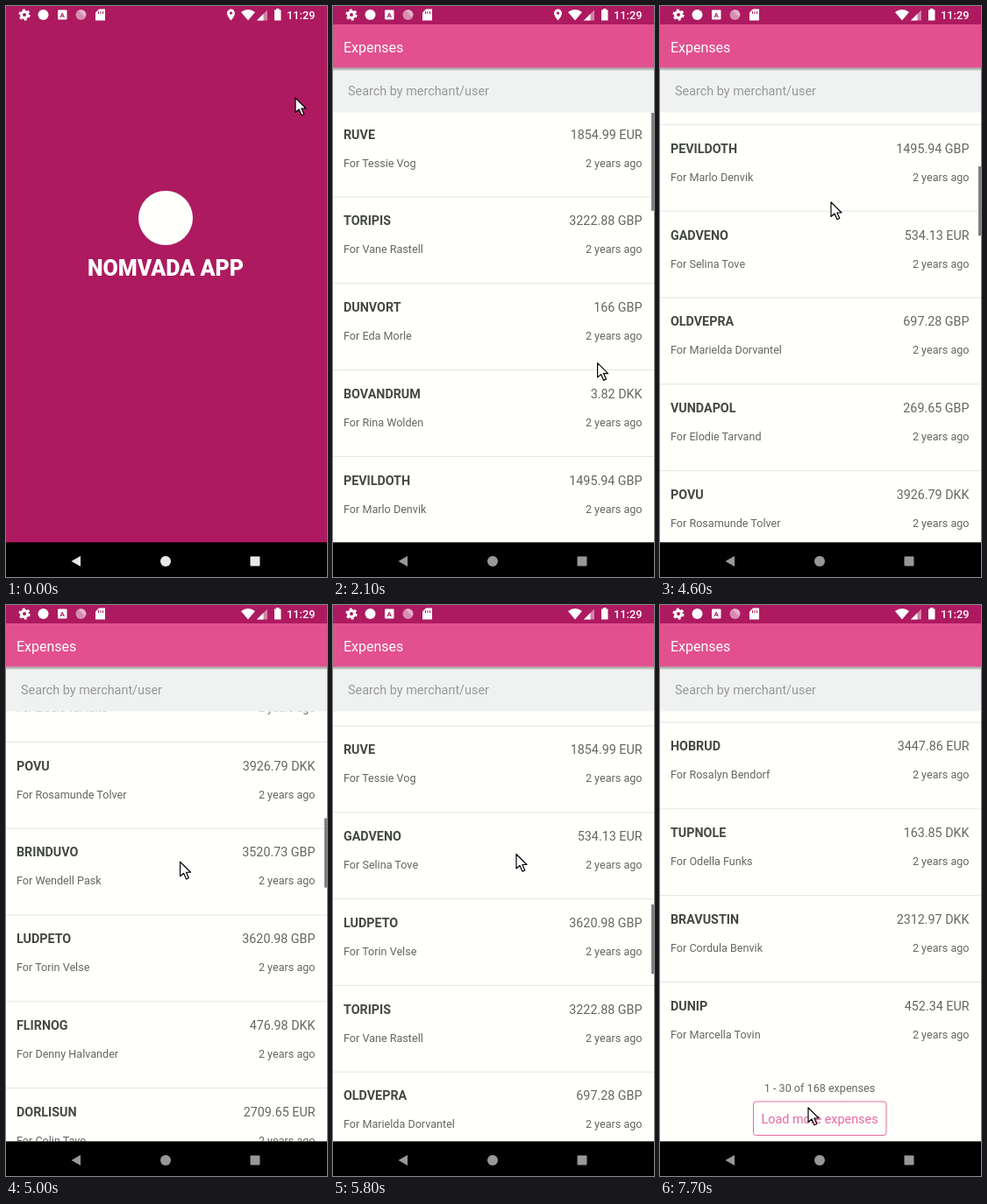
An HTML page that plays this animation: 366 by 652 pixels, repeating every 8000 ms.

```html
<!DOCTYPE html>
<html lang="en">
<head>
<meta charset="utf-8">
<title>Expenses</title>
<style>
  html, body { margin: 0; width: 100%; height: 100%; overflow: hidden; background: #000; }
  svg { display: block; width: 366px; height: 652px; font-family: Roboto, sans-serif; }
  .title { font-size: 14.3px; font-weight: 700; fill: #444842; }
  .amount { font-size: 14.3px; fill: #646662; }
  .note { font-size: 12.6px; fill: #646662; }
  .end { text-anchor: end; }
  .mid { text-anchor: middle; }
</style>
</head>
<body>
<svg viewBox="0 0 366 652">
  <defs>
    <clipPath id="listClip"><rect y="121.5" width="366" height="491"/></clipPath>
    <linearGradient id="shade" x2="0" y2="1">
      <stop stop-color="#000" stop-opacity=".4"/>
      <stop offset="1" stop-color="#000" stop-opacity="0"/>
    </linearGradient>
  </defs>
  <rect width="366" height="652" fill="#fffffc"/>

  <g clip-path="url(#listClip)">
    <g id="list"></g>
    <path id="glow" fill="#e04f8f"/>
    <rect id="bar" x="363" width="3" fill="#7e7e7e"/>
  </g>

  <rect y="70" width="366" height="51.5" fill="#f0f2f1"/>
  <text x="17" y="102" font-size="14.4" fill="#979997">Search by merchant/user</text>
  <rect y="70.4" width="366" height="4" fill="url(#shade)"/>
  <rect y="21" width="366" height="49.4" fill="#e2508f"/>
  <text x="12" y="52.6" font-size="16" fill="#fff">Expenses</text>

  <g id="splash">
    <rect y="21" width="366" height="592" fill="#ad1a60"/>
    <circle cx="182" cy="242" r="31" fill="#fffffc"/>
    <text class="mid" x="182" y="307.5" font-size="25" font-weight="900" fill="#fffffc">NOMVADA APP</text>
  </g>

  <rect width="366" height="21" fill="#ad1a60"/>
  <g fill="#fff" transform="translate(0 -.4)">
    <circle cx="21" cy="10.5" r="3.5" fill="none" stroke="#fff" stroke-width="3"/>
    <circle cx="21" cy="10.5" r="5.6" fill="none" stroke="#fff" stroke-width="2" stroke-dasharray="2.93"/>
    <circle cx="42.5" cy="10.5" r="6"/>
    <rect x="59" y="5" width="10.5" height="11" rx="1"/>
    <text class="mid" x="64.2" y="13.5" font-size="8" font-weight="700" fill="#ad1a60">A</text>
    <circle cx="85.5" cy="10.5" r="6" opacity=".5"/>
    <path d="M83 6a5 5 0 0 1 7 7z" opacity=".35"/>
    <path d="M106 4h7v13h-11V8z"/>
    <path d="M105.5 6.5v3m2.5-3v3m2.5-3v3" stroke="#ad1a60"/>
    <g id="pin">
      <path d="M252 8.5a4.5 4.5 0 0 1 9 0q0 3.5-4.500 8.500q-4.500-5-4.500-8.500z"/>
      <circle cx="256.5" cy="8.5" r="1.6" fill="#ad1a60"/>
    </g>
    <path d="M268 7.500Q276 1.500 284 7.500L276 17z"/>
    <path d="M298 5v12h-12z" opacity=".45"/>
    <path d="M293.500 9.500V17H286z"/>
    <path d="M308 3.500h3.500V5h2v12H306V5h2z"/>
    <text x="320" y="15.4" font-size="12.8" font-weight="500">11:29</text>
  </g>

  <rect y="612.4" width="366" height="40" fill="#000"/>
  <g id="nav">
    <path d="M74.500 634l10.500-6v12z"/>
    <circle cx="182" cy="634" r="6"/>
    <rect x="278.5" y="628.5" width="11" height="11" rx="1"/>
  </g>
  <path id="cursor" d="M0 0V16.500L4 13L7 19.800L9.800 18.500L6.900 12H12Z" fill="#fff" stroke="#000" stroke-width="1.2" stroke-linejoin="round"/>
</svg>
<script>
const LOOP = 8000, STEP = 100;
const LIST_TOP = 122, LIST_H = 491, ROW_H = 98.8, ROWS = 30, FOOTER_H = 81;
const MAX_SCROLL = ROWS * ROW_H + FOOTER_H - LIST_H;
const FLING = 379, REST = 878;

const firstRows = `RUVE|Tessie Vog|1854.99 EUR
TORIPIS|Vane Rastell|3222.88 GBP
DUNVORT|Eda Morle|166 GBP
BOVANDRUM|Rina Wolden|3.82 DKK
PEVILDOTH|Marlo Denvik|1495.94 GBP
GADVENO|Selina Tove|534.13 EUR
OLDVEPRA|Marielda Dorvantel|697.28 GBP
VUNDAPOL|Elodie Tarvand|269.65 GBP
POVU|Rosamunde Tolver|3926.79 DKK
BRINDUVO|Wendell Pask|3520.73 GBP
LUDPETO|Torin Velse|3620.98 GBP
FLIRNOG|Denny Halvander|476.98 DKK
DORLISUN|Colin Tave|2709.65 EUR
VOLIBI|Carver Delnoux|1729.41 DKK`.split("\n");
const lastRows = `HOBRUD|Rosalyn Bendorf|3447.86 EUR
TUPNOLE|Odella Funks|163.85 DKK
BRAVUSTIN|Cordula Benvik|2312.97 DKK
DUNIP|Marcella Tovin|452.34 EUR`.split("\n");

const $ = id => document.getElementById(id);
const set = (id, attrs) => {
  for (const key in attrs) $(id).setAttribute(key, attrs[key]);
};
const progress = (t, from, to) => Math.max(0, Math.min(1, (t - from) / (to - from)));
const easeOut = u => 1 - (1 - u) ** 3;
const smooth = u => u * u * (3 - 2 * u);

function rowMarkup(i) {
  const tail = i - (ROWS - lastRows.length);
  const source = tail >= 0 ? lastRows[tail] : firstRows[i] || firstRows[i * 5 % firstRows.length];
  const [merchant, user, amount] = source.split("|");
  const line = i < ROWS - 1 ? '<rect y="217.5" width="366" height="1" fill="#e4e4e0"/>' : "";
  return `<g transform="translate(0 ${i * ROW_H})">
    <text class="title" x="12" y="151.5">${merchant}</text>
    <text class="amount end" x="352.5" y="151.5">${amount}</text>
    <text class="note" x="12" y="183.5">For ${user}</text>
    <text class="note end" x="352.5" y="183.5">2 years ago</text>${line}</g>`;
}

$("list").innerHTML = Array.from({ length: ROWS }, (_, i) => rowMarkup(i)).join("") +
  `<g transform="translate(0 ${MAX_SCROLL})">
    <text class="note mid" x="182" y="556">1 - 30 of 168 expenses</text>
    <g id="button">
      <rect x="106.5" y="567" width="151.5" height="38.5" rx="3" fill="none" stroke="#e2508f"/>
      <text class="mid" x="182" y="592" font-size="14.4" fill="#e2508f">Load more expenses</text>
    </g></g>`;

// Each gesture glides the cursor on from wherever the previous one left it.
const gestures = [
  { from: 0, to: 1000, x: 301.6, y: 407.6, ease: easeOut },
  { from: 3300, to: 3700, x: 212, y: 352 },
  { from: 3700, to: 3900, x: 187, y: 423 },
  { from: 4100, to: 4600, x: 195, y: 224 },
  { from: 4700, to: 5400, x: 204, y: 400 },
  { from: 5500, to: 6100, x: 214, y: 169 },
  { from: 6400, to: 7000, x: 172, y: 537 },
  { from: 7100, to: 7500, x: 169, y: 574 }
];

function cursorAt(t) {
  let x = 330, y = 105;
  for (const g of gestures) {
    const u = (g.ease || smooth)(progress(t, g.from, g.to));
    x += (g.x - x) * u;
    y += (g.y - y) * u;
  }
  return `translate(${x} ${y})`;
}

// A drag that gathers speed and coasts to rest, then one that runs to the end.
function scrollAt(t) {
  const drag = FLING * progress(t, 4100, 4600) ** 1.6;
  const coast = (REST - FLING) * (1 - (1 - progress(t, 4600, 5400)) ** 2);
  const run = (MAX_SCROLL - REST) * progress(t, 5500, 6150) ** 1.6;
  return drag + coast + run;
}

function drawBar(t, scroll) {
  const loaded = t < 1300 ? 10 : t < 2100 ? 11 : t < 4200 ? 21 : ROWS;
  const ratio = LIST_H / (loaded * ROW_H + FOOTER_H);
  const opacity = 1 - (t < 4200 ? progress(t, 2400, 2600) : progress(t, 6500, 6800));
  set("bar", { y: LIST_TOP + scroll * ratio, height: LIST_H * ratio, opacity });
}

function drawGlow(t) {
  const size = progress(t, 6100, 6200) * (1 - progress(t, 6400, 7000));
  const top = 613 - 46 * size, edge = top + 33 * size;
  set("glow", { d: `M0 613V${edge}Q183 ${2 * top - edge} 366 ${edge}V613Z`, opacity: .15 * size });
}

function draw(t) {
  const scroll = scrollAt(t);
  const fade = progress(t, 300, 600);
  const grey = Math.round(232 - 80 * fade);
  set("list", { transform: `translate(0 ${-scroll})` });
  set("splash", { opacity: 1 - fade });
  set("nav", { fill: `rgb(${grey},${grey},${grey})` });
  set("pin", { opacity: t < 3300 ? 1 : 0 });
  set("button", { opacity: t < 7700 ? 1 : .85 });
  set("cursor", { transform: cursorAt(t) });
  drawBar(t, scroll);
  drawGlow(t);
}

const start = performance.now();
function tick() {
  const t = (performance.now() - start) % LOOP;
  draw(Math.floor(t / STEP) * STEP);
  requestAnimationFrame(tick);
}
tick();
</script>
</body>
</html>
```
